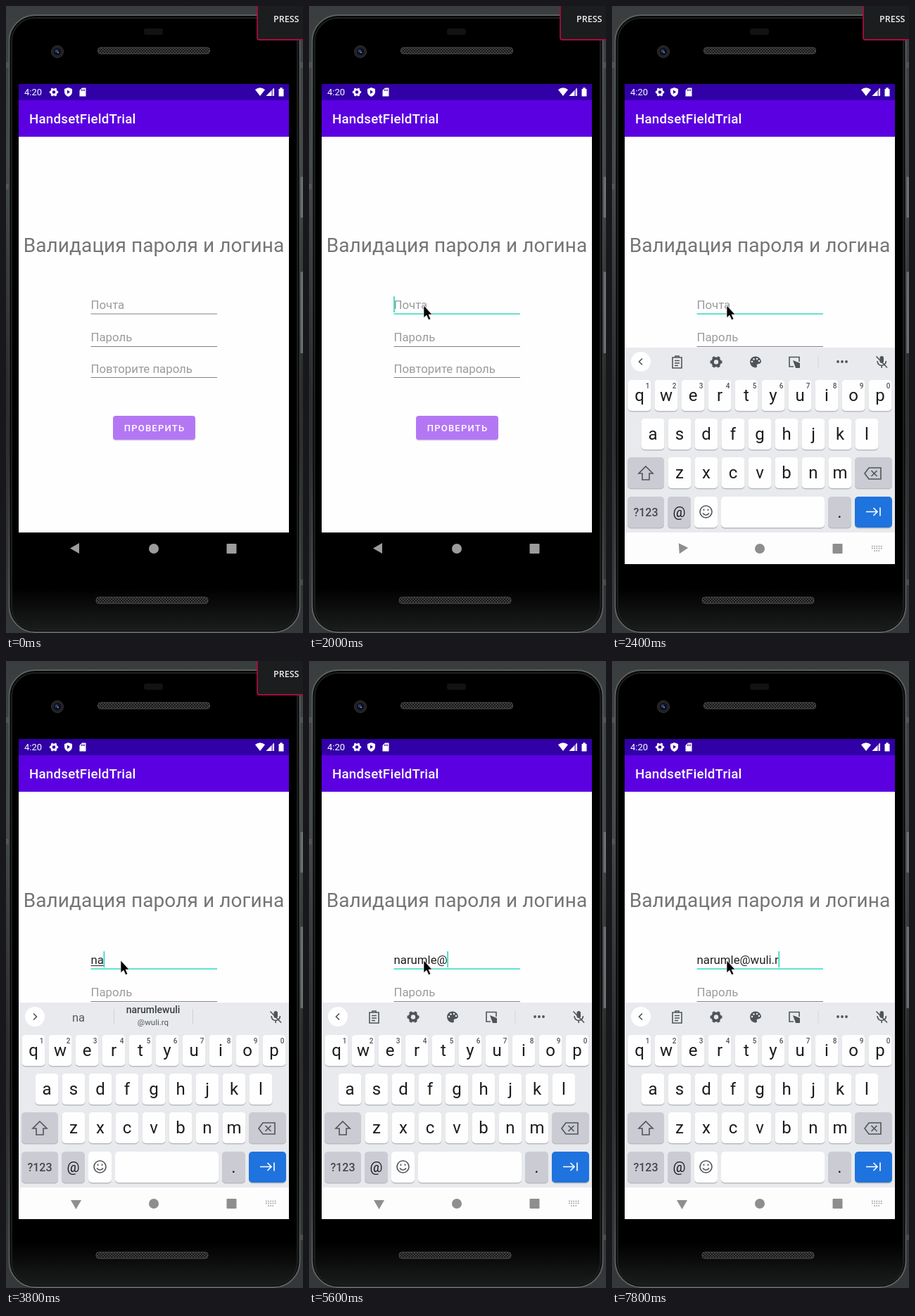
Animation, 422 px wide and 892 px high, one loop 8 s. Source, as an HTML page:

```html
<!DOCTYPE html>
<html lang="ru">
<head>
<meta charset="utf-8">
<style>
html, body { margin: 0; width: 100%; height: 100%; overflow: hidden; background: #3b3e3f; }
svg { display: block; width: 100%; height: 100%; font-family: Roboto, sans-serif; }
.mid { text-anchor: middle; }
.hint { font-size: 16.8px; fill: #9b9b9b; }
.line { fill: none; stroke-width: 1.6; }
</style>
</head>
<body>
<svg id="stage" viewBox="0 0 422 892">
  <defs>
    <clipPath id="screen"><rect x="18" y="111" width="384" height="683"/></clipPath>
    <pattern id="mesh" width="4" height="4" patternUnits="userSpaceOnUse">
      <rect width="4" height="4" fill="#171717"/>
      <path d="M0 0L4 4M4 0L0 4" stroke="#4a4a4a" stroke-width=".8"/>
    </pattern>
    <linearGradient id="rim" x2="0" y2="1">
      <stop offset="0" stop-color="#5b5f5f"/><stop offset=".3" stop-color="#454848"/>
      <stop offset=".7" stop-color="#2c2e2e"/><stop offset="1" stop-color="#606363"/>
    </linearGradient>
    <linearGradient id="base" x2="0" y2="1">
      <stop offset="0"/><stop offset=".93"/><stop offset="1" stop-color="#1b1c1c"/>
    </linearGradient>
    <linearGradient id="back" x2="0" y2="1">
      <stop offset="0" stop-color="#3a3d3e"/><stop offset=".25" stop-color="#464949"/>
      <stop offset=".6" stop-color="#2b2d2d"/><stop offset="1" stop-color="#353838"/>
    </linearGradient>
  </defs>

  <g id="phone">
    <rect width="422" height="892" fill="url(#back)"/>
    <path d="M0 84H6M0 257H6M416 84H422M416 820H422" stroke="#777" stroke-width="8" opacity=".35"/>
    <rect x="417" y="243" width="8" height="58" rx="2" fill="#6b6e6e"/>
    <rect x="417" y="378" width="8" height="116" rx="2" fill="#6b6e6e"/>
    <rect x="4.5" y="13" width="413" height="878" rx="37" fill="#050505" stroke="url(#rim)" stroke-width="2"/>
    <rect x="8" y="17" width="406" height="871" rx="33" fill="url(#base)" stroke="#1d1f1f" stroke-width="2"/>
    <rect x="196" y="32" width="27" height="9" rx="3" fill="#121212"/>
    <circle cx="73" cy="65" r="8.5" fill="#202123" stroke="#303235"/>
    <circle cx="73" cy="65" r="5" fill="#0b0e1c"/>
    <circle cx="72" cy="64" r="2.3" fill="#34406e"/>
    <circle cx="74" cy="66" r="1" fill="#8d9be0"/>
    <rect x="130.5" y="59" width="159" height="9" rx="4" fill="url(#mesh)" stroke="#4d4d4d"/>
    <rect x="128" y="841" width="159" height="9" rx="4" fill="url(#mesh)" stroke="#4d4d4d"/>
  </g>

  <g clip-path="url(#screen)">
    <rect x="18" y="111" width="384" height="683"/>
    <rect x="18" y="186" width="384" height="563" fill="#fdfefd"/>
    <rect x="18" y="133" width="384" height="53" fill="#5b00e1"/>
    <rect x="18" y="111" width="384" height="23" fill="#3100a6"/>
    <g id="status" fill="#fff">
      <text x="26" y="127" font-size="13">4:20</text>
      <path d="M88.500 116L94 118V122Q94 127 88.500 129Q83 127 83 122V118Z"/>
      <path d="M87 119.500L91 122.300L87 125Z" fill="#3100a6"/>
      <path d="M108 116.500H113.500V128.500H104.500V120Z"/>
      <path d="M107.500 118.500V121M109.500 118.500V121M111.500 118.500V121" stroke="#3100a6"/>
      <path d="M354 119Q361 113.500 368 119L361 128Z"/>
      <path d="M381 116V128H369.500Z" opacity=".5"/>
      <path d="M377 120.500V128H369.500ZM379.500 117.500H381V128H379.500Z"/>
      <path d="M387.500 118H389.300V116.300H392.700V118H394.500V128.500H387.500Z"/>
    </g>
    <text x="33" y="167" font-size="18.7" font-weight="500" letter-spacing=".23" fill="#fff">HandsetFieldTrial</text>
    <text class="mid" x="210" y="350" font-size="28" letter-spacing=".1" fill="#757575">Валидация пароля и логина</text>

    <text id="mailHint" class="hint" x="120.500" y="431">Почта</text>
    <text class="hint" x="120.500" y="477">Пароль</text>
    <text class="hint" x="120.500" y="522">Повторите пароль</text>
    <path d="M120.500 484.500H300M120.500 528.500H300" stroke="#808080"/>
    <path id="mailLine" d="M120.500 438H300"/>
    <text id="mail" x="120.500" y="431" font-size="16.800" fill="#202020"></text>
    <path id="compose" stroke="#202020"/>
    <path id="caret" stroke="#2fd9c0" stroke-width="1.700"/>

    <rect x="152" y="585" width="117" height="33.500" rx="4" fill="#000" opacity=".16"/>
    <rect x="152" y="583" width="117" height="34" rx="4" fill="#b477f4"/>
    <text class="mid" x="211" y="605" font-size="13.080" font-weight="500" letter-spacing="1.170" fill="#fff">ПРОВЕРИТЬ</text>

    <g id="keyboard">
      <rect x="18" y="486" width="384" height="264" fill="#e8eaed"/>
      <rect x="18" y="749" width="384" height="180" fill="#fdfdfd"/>
      <circle cx="41" cy="506" r="14" fill="#fff"/>
      <path id="chevron" class="line" stroke="#505458"/>
      <g id="tools"></g>
      <g id="hints" fill="#55595d">
        <path d="M153.500 495V517M265.500 495V517" stroke="#cfd1d4"/>
        <text id="guess" class="mid" x="103" y="513" font-size="16.500"></text>
        <text class="mid" x="209" y="501" font-size="14" font-weight="500" fill="#3c4043">narumlewuli</text>
        <text class="mid" x="209" y="518" font-size="11.500">@wuli.rq</text>
      </g>
      <g id="mic"></g>
      <g id="keys"></g>
    </g>

    <g id="nav">
      <path id="navBack" d="M-8.500 0L4.500 -7.500V7.500Z"/>
      <circle cx="210" cy="772" r="7"/>
      <rect x="313.500" y="765" width="14" height="14" rx="1"/>
      <path id="navKeys" d="M369 768.500H384M369 771.500H384M372 775H381" fill="none" stroke-width="1.700" stroke-dasharray="1.700 1.500"/>
    </g>
  </g>

  <path id="cursor" d="M0 0V17.500L4 14L7 20.500L9.800 19.300L7 13H12Z" fill="#050505" stroke="#fff" stroke-width=".6"/>
  <g id="press">
    <rect x="357" y="-6" width="80" height="54" rx="3" fill="#1c1d1f" stroke="#a30f3b" stroke-width="1.800"/>
    <text x="380" y="23" font-family="'Open Sans', sans-serif" font-size="12.500" font-weight="600" fill="#eee">PRESS</text>
  </g>
</svg>
<script>
const LOOP = 8000, STEP = 200, FOCUS = 1800;
const MAIL = "narumle@wuli.r";
const KEY_TIMES = [3400, 3600, 4000, 4200, 4400, 4800, 5000, 5400, 5800, 6000, 6800, 7000, 7400, 7600];
const CURSOR = [[1000, 24, 330], [1200, 72, 366], [1400, 121, 402], [1600, 150, 420], [1800, 163, 426]];
const INK = "#505458";

const $ = id => document.getElementById(id);
const set = (id, attrs) => { for (const k in attrs) $(id).setAttribute(k, attrs[k]); };
const show = (id, on) => set(id, { visibility: on ? "visible" : "hidden" });

const gear = (x, y, r, color) => `<g fill="none" stroke="${color}">
  <circle cx="${x}" cy="${y}" r="${r * .6}" stroke-width="${r * .45}"/>
  <circle cx="${x}" cy="${y}" r="${r * .85}" stroke-width="${r * .3}" pathLength="12" stroke-dasharray="1 1" stroke-dashoffset=".5"/></g>`;

const key = (x, y, w, fill) =>
  `<rect x="${x}" y="${y + 1}" width="${w}" height="44.5" rx="5" fill="#b9bbbf"/>
   <rect x="${x}" y="${y}" width="${w}" height="44" rx="5" fill="${fill}"/>`;
const label = (x, y, text, size = 24, color = "#1b1c1e", weight = 400) =>
  `<text class="mid" x="${x}" y="${y}" font-size="${size}" font-weight="${weight}" fill="${color}">${text}</text>`;
const line = (d, color = INK) => `<path class="line" d="${d}" stroke="${color}"/>`;

function buildKeyboard() {
  const GREY = "#cbccd3", WHITE = "#fefefe";
  let out = "";
  [["qwertyuiop", 39, 532], ["asdfghjkl", 58, 587], ["zxcvbnm", 96, 642]].forEach(([row, x0, y], r) => {
    [...row].forEach((ch, i) => {
      const x = x0 + i * 38;
      out += key(x - 16.5, y, 33, WHITE) + label(x, y + 30, ch);
      if (!r) out += label(x + 11.5, y + 12, (i + 1) % 10, 10, INK, 500);
    });
  });
  out += key(22, 642, 52, GREY) + line("M48 655L58 665H53V674H43V665H38Z")
    + key(345, 642, 53, GREY) + line("M365 657H382V673H365L359 665ZM368.500 661L376.500 669M376.500 661L368.500 669")
    + key(22, 698, 52, GREY) + label(48, 726, "?123", 16, "#44474b", 500)
    + key(79, 698, 33, GREY) + label(95.5, 727, "@", 20)
    + key(117, 698, 33, WHITE)
    + `<circle class="line" cx="133.500" cy="719.500" r="8.500" stroke="${INK}"/>`
    + line("M129 721.500Q133.500 727 138 721.500M130.500 715.500V718M136.500 715.500V718")
    + key(155, 698, 147, WHITE)
    + key(307, 698, 33, GREY) + label(323.5, 728, ".")
    + key(345, 698, 53, "#1f73de") + line("M361 719.500H377M371.500 714L377 719.500L371.500 725M381 713.500V725.500", "#fff");
  $("keys").innerHTML = out;

  $("tools").innerHTML =
    line("M86 500H99V515H86ZM90 500V498H95V500M89 504.500H96M89 508H96M89 511.500H94")
    + gear(148, 506.5, 8.5, INK)
    + `<path d="M204 498.500C193 499 194 514 204 514.500Q207 514 205.500 511Q206 509 209 509Q212 508 212 505Q210 498.500 204 498.500Z" fill="${INK}"/>`
    + [[199, 506], [201.5, 502.5], [206, 502], [209, 505]].map(([x, y]) => `<circle cx="${x}" cy="${y}" r="1.300" fill="#e8eaed"/>`).join("")
    + line("M258 513H252V499.500H266V506")
    + `<path d="M257 504L267 508V515H261Z" fill="${INK}"/>`
    + `<path d="M293 497V516" stroke="#d5d7da"/>`
    + [321, 327, 333].map(x => `<circle cx="${x}" cy="506" r="1.900" fill="${INK}"/>`).join("");

  $("mic").innerHTML = `<rect x="380.500" y="498" width="5.500" height="10" rx="2.700" fill="${INK}"/>`
    + line("M377 505Q377.500 511 383 511.500Q389 511 389.500 505M383.200 511.500V515M375.500 498.500L391 514.500");
}

function cursorAt(t) {
  if (t < CURSOR[0][0]) return null;
  const i = CURSOR.findIndex(p => p[0] > t);
  if (i < 0) return CURSOR.at(-1).slice(1);
  const [a, b] = [CURSOR[i - 1], CURSOR[i]], k = (t - a[0]) / (b[0] - a[0]);
  return [a[1] + (b[1] - a[1]) * k, a[2] + (b[2] - a[2]) * k];
}

const typedAt = t => KEY_TIMES.filter(k => k <= t).length;

function render(t) {
  const pos = cursorAt(t);
  show("cursor", pos);
  if (pos) set("cursor", { transform: `translate(${pos})` });
  show("press", t < 5000);

  const focused = t >= FOCUS, n = typedAt(t);
  set("mailLine", { stroke: focused ? "#35d9c1" : "#808080", "stroke-width": focused ? 1.7 : 1 });
  show("mailHint", !n);
  $("mail").textContent = MAIL.slice(0, n);
  const end = 120.5 + (n ? $("mail").getComputedTextLength() : 0);
  const composing = n > 0 && n < 8;
  show("compose", composing);
  set("compose", { d: `M120.5 433.5H${end}` });
  const lastKey = n ? KEY_TIMES[n - 1] : FOCUS;
  show("caret", focused && (t - lastKey) % 1000 < 500);
  set("caret", { d: `M${end + .5} 413V436` });

  // The keyboard rises and fades in over two steps.
  const rise = Math.min(1, Math.max(0, (t - 2000) / 400));
  show("keyboard", rise > 0);
  set("keyboard", { transform: `translate(0 ${262 * (1 - rise)})`, opacity: rise });

  const hints = composing && t >= 3600;
  $("hints").style.display = hints ? "" : "none";
  $("tools").style.display = hints ? "none" : "";
  $("guess").textContent = MAIL.slice(0, Math.max(1, typedAt(t - STEP)));
  set("chevron", { d: hints ? "M39 501.500L43.500 506L39 510.500" : "M43 501.500L38.500 506L43 510.500" });

  const turn = t < 2400 ? 0 : t < 2600 ? -64 : -90;
  set("nav", { fill: rise < 1 ? "#9c9c9c" : "#8e8e8e" });
  set("navBack", { transform: `translate(99.5 771.5) rotate(${turn})` });
  set("navKeys", { stroke: "#999" });
  show("navKeys", rise > 0);
}

buildKeyboard();
$("status").insertAdjacentHTML("beforeend", gear(68, 122.5, 6.2, "#fff"));

const start = performance.now();
function frame() {
  const t = (performance.now() - start) % LOOP;
  render(Math.floor(t / STEP) * STEP);
  requestAnimationFrame(frame);
}
frame();
</script>
</body>
</html>
```
